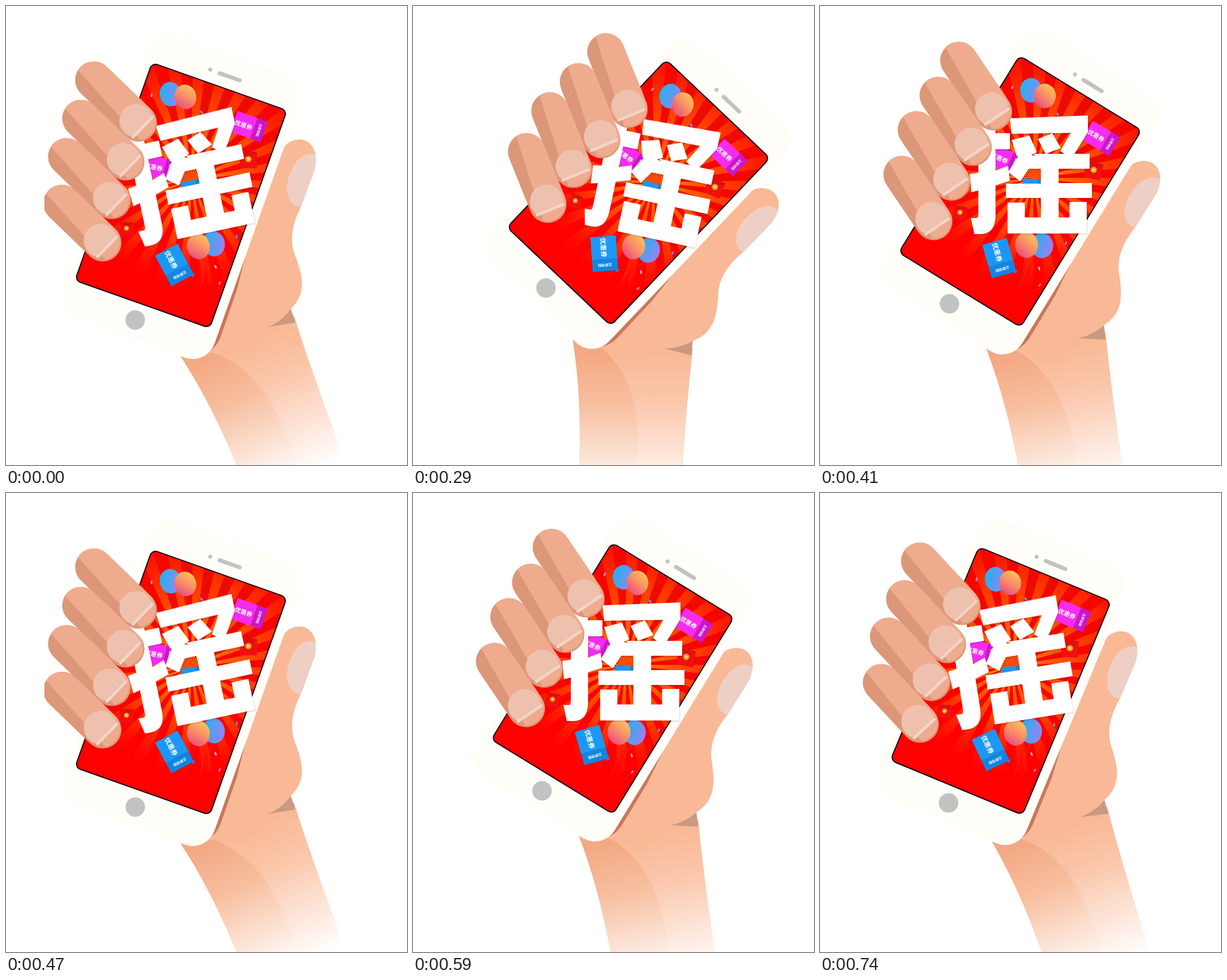
An HTML page that plays this animation: 699 by 801 pixels, repeating every 0.77 s.

```html
<!DOCTYPE html>
<html lang="zh-CN">
<head>
<meta charset="utf-8">
<title>摇一摇</title>
<style>
html, body { margin: 0; width: 100%; height: 100%; overflow: hidden; background: #fff; }
svg { display: block; }
.label {
  font-family: "Noto Sans CJK SC", "Noto Sans CJK", sans-serif; font-weight: 700;
  text-anchor: middle; dominant-baseline: central; fill: #fff;
}
.lettering { fill: #fff; filter: drop-shadow(1px 2px 1px #0002); }
</style>
</head>
<body>
<svg width="699" height="801" viewBox="0 0 699 801">
  <defs>
    <clipPath id="stage"><rect x="67" width="632" height="801"/></clipPath>
    <clipPath id="glass"><rect x="-123.6" y="-201" width="247.2" height="401" rx="9" transform="translate(348.5 324) rotate(31.5)"/></clipPath>
    <clipPath id="litSide"><path d="M-6-40H60V200H-24Z"/></clipPath>
    <linearGradient id="arm" gradientUnits="userSpaceOnUse" x1="414" y1="598" x2="466" y2="845">
      <stop offset="0" stop-color="#f9b996"/><stop offset=".3" stop-color="#fac5a8"/><stop offset="1" stop-color="#fff"/>
    </linearGradient>
    <linearGradient id="armShade" gradientUnits="userSpaceOnUse" x1="402" y1="600" x2="454" y2="845">
      <stop offset="0" stop-color="#f3a983"/><stop offset=".35" stop-color="#f7bf9f"/><stop offset="1" stop-color="#fff"/>
    </linearGradient>
    <radialGradient id="glow" gradientUnits="userSpaceOnUse" cx="385" cy="275" r="220" fx="372" fy="300">
      <stop offset="0" stop-color="#ff9a10"/><stop offset=".25" stop-color="#ff6200"/>
      <stop offset=".6" stop-color="#ff3400"/><stop offset="1" stop-color="#ff2000" stop-opacity="0"/>
    </radialGradient>
    <radialGradient id="dusk" gradientUnits="userSpaceOnUse" cx="440" cy="190" r="220">
      <stop offset="0" stop-color="#ea0c00"/><stop offset="1" stop-color="#ff0000"/>
    </radialGradient>
    <linearGradient id="blue" x1="0" y1=".35" x2="1" y2=".75">
      <stop offset="0" stop-color="#22b2f2"/><stop offset=".5" stop-color="#5c9bf0"/><stop offset="1" stop-color="#a87cee"/>
    </linearGradient>
    <linearGradient id="orange" x1=".8" y1=".1" x2=".2" y2=".9">
      <stop offset="0" stop-color="#fcc25c"/><stop offset=".5" stop-color="#f88d66"/><stop offset="1" stop-color="#ea5080"/>
    </linearGradient>
  </defs>
  <g clip-path="url(#stage)">
    <g id="scene">
      <path fill="url(#arm)" d="M291 590L498 570Q504 640 527 801L543 920H362L345 801Q325 690 291 601Z"/>
      <path fill="url(#armShade)" d="M285 585L335 596C395 632 432 680 447 801L458 920H362L345 801Q325 690 291 601Z"/>
      <path fill="#c99982" d="M449 580L440 565L494 550L498 582Z"/>
      <path fill="#f9b996" d="M500 340L540 281C549 268 580 264 590 286C596 300 592 314 586 328L549 387C528 412 518 440 521 464C528 506 528 536 495 557Q477 574 449 580L420 612Q370 620 340 601L340 500Z"/>
      <path fill="#edcfc5" d="M592 302C574 294 556 304 541 328C527 350 526 380 549 387L586 328Q593 315 592 302Z"/>
      <path fill="#cc765b" d="M330 603Q352 600 366 578L410 505Q428 468 442 440L400 440Z"/>
      <g transform="translate(348.5 324) rotate(31.5)">
        <rect x="-141.5" y="-264" width="283" height="528" rx="40" fill="#fffef8"/>
        <circle cx="-2.5" cy="231" r="17" fill="#c1c3c3"/>
        <circle cx="-25" cy="-224.5" r="3.5" fill="#c1c3c3"/>
        <rect x="-11" y="-227.5" width="44" height="7" rx="3.5" fill="#c1c3c3"/>
        <rect x="-125.6" y="-203" width="251.2" height="405" rx="11" fill="#0a0612"/>
      </g>
      <g clip-path="url(#glass)">
        <rect width="699" height="801" fill="url(#dusk)"/>
        <path id="rays" fill="url(#glow)"/>
        <g id="decor"></g>
      </g>
      <g class="lettering" role="img" aria-label="摇">
        <path d="M276 192H306V222H331V250H306V287L328 279L331 305L306 313V364Q306 398 280 398H269L263 370H272Q276 370 276 364V322L264 325L261 293L276 291V250H262V222H276Z"/>
        <path d="M331 196L467 191V221L334 223Z"/>
        <path d="M334 234L365 226L378 255L360 264L343 262Z"/>
        <path d="M380 232L405 222L420 248L393 258Z"/>
        <path d="M438 220H467L438 267L419 253Z"/>
        <path d="M350 255L376 262L372 258H470V284H416V309H474V335H416V369H435V342H465V397H327V343H357V369H385V335H324V310H385V284H364L349 306L328 290Z"/>
      </g>
      <g id="fingers"></g>
    </g>
  </g>
</svg>
<script>
const byId = id => document.getElementById(id);

const CENTER = [372, 300], RAY_COUNT = 28, REACH = 320;
const rim = angle => `${CENTER[0] + REACH * Math.cos(angle)} ${CENTER[1] + REACH * Math.sin(angle)}`;
const wedge = (_, i) => {
  const start = (i * 2 * Math.PI) / RAY_COUNT;
  return `M${CENTER.join(' ')}L${rim(start)}L${rim(start + Math.PI / RAY_COUNT)}Z`;
};
byId('rays').setAttribute('d', Array.from({ length: RAY_COUNT }, wedge).join(''));

const balloon = (x, y, r, color) =>
  `<ellipse cx="${x}" cy="${y}" rx="${r}" ry="${r + 2.5}" fill="url(#${color})"/>`;

const coupon = (x, y, angle, scale, body, stub, height = 38) => `
  <g transform="translate(${x} ${y}) rotate(${angle}) scale(${scale})">
    <rect x="-28" y="${-height / 2}" width="37" height="${height}" fill="${body}"/>
    <rect x="9" y="${-height / 2}" width="19" height="${height}" fill="${stub}"/>
    <text class="label" x="-10" font-size="10.5">优惠券</text>
    <text class="label" font-size="5.8" transform="translate(18.5 0) rotate(90)">立即领取</text>
  </g>`;

const packet = (x, y, s) => `
  <g transform="translate(${x} ${y}) rotate(12) scale(${s})">
    <path d="M-15-13H15V16H-15Z" fill="#f01010"/>
    <path d="M-15-13H15L0 1Z" fill="#dc0e12"/>
    <circle r="5.5" fill="#ff9d1c"/><path d="M-2-2L2 2M2-2L-2 2" stroke="#fff0a0" stroke-width="1.6"/>
  </g>`;

const fleck = (x, y, angle, color) =>
  `<rect x="-1.5" y="-3" width="3" height="6" fill="${color}" transform="translate(${x} ${y}) rotate(${angle})"/>`;

byId('decor').innerHTML = `
  <path d="M390 178Q384 190 391 205M372 168Q382 184 380 200M358 438Q366 455 347 490M386 438Q362 458 367 484"
    fill="none" stroke="#ff5050" stroke-width=".8" opacity=".6"/>
  ${balloon(368, 147, 19, 'blue')}${balloon(392, 157, 19, 'orange')}
  ${balloon(387, 418, 19.5, 'blue')}${balloon(360, 417, 20, 'orange')}
  ${packet(477, 286, 1)}${packet(244, 360, .8)}
  ${coupon(490, 231, 31.5, 1, '#f52cf0', '#cb16cc')}
  ${coupon(322, 269, 25, 1, '#f52cf0', '#cb16cc')}
  ${coupon(372, 318, 5, .7, '#1b98f0', '#0f84dc', 46)}
  ${coupon(312.5, 440, 74, 1.08, '#1b98f5', '#0f86e2', 41)}
  ${fleck(335, 142, 20, '#d08cc0')}${fleck(414, 189, -30, '#5aa8e8')}${fleck(383, 487, 40, '#f06a8a')}
  ${fleck(429, 414, 15, '#6a8ae0')}${fleck(382, 458, -15, '#e0a8c0')}${fleck(341, 464, 50, '#3c7ae0')}`;

const RADIUS = 32.5;
const finger = ([x, y, length]) => {
  const capsule = `x="${-RADIUS}" y="${-RADIUS}" width="${2 * RADIUS}" rx="${RADIUS}"`;
  return `<g transform="translate(${x} ${y}) rotate(-34)">
    <rect ${capsule} height="${length + 2 * RADIUS}" fill="#dc9778"/>
    <g clip-path="url(#litSide)"><rect ${capsule} height="${length + 2 * RADIUS - 3}" fill="#efab8e"/></g>
    <g transform="translate(0 ${length})">
      <path d="M-24 10.5A29 29 0 1 1 24 10.5Z" fill="#edc1ae"/>
      <path d="M-24 10.5H24" stroke="#f3d4c8" stroke-width="5" stroke-linecap="round"/>
    </g>
  </g>`;
};
byId('fingers').innerHTML =
  [[242, 95, 108], [206, 156, 109], [168, 216, 110], [143, 294, 99]].map(finger).join('');

const LOOP = 770, REST = 200, STEP = 30, BASE_TILT = 12;

// A wide swing of ten steps, then one of half the size.
function swing(step) {
  return step <= 10 ? 6 * (5 - Math.abs(step - 5)) : 3 * (5 - Math.abs(step - 15));
}

function render(time) {
  const t = time % LOOP;
  const step = t < REST ? 0 : Math.floor((t - REST) / STEP) + 1;
  const shift = step > 10 ? -0.8 : 0;
  byId('scene').setAttribute('transform',
    `translate(${shift} 0) rotate(${swing(step) - BASE_TILT} 360 535.5)`);
}

const begin = performance.now();
function tick() {
  render(performance.now() - begin);
  requestAnimationFrame(tick);
}
tick();
</script>
</body>
</html>
```
